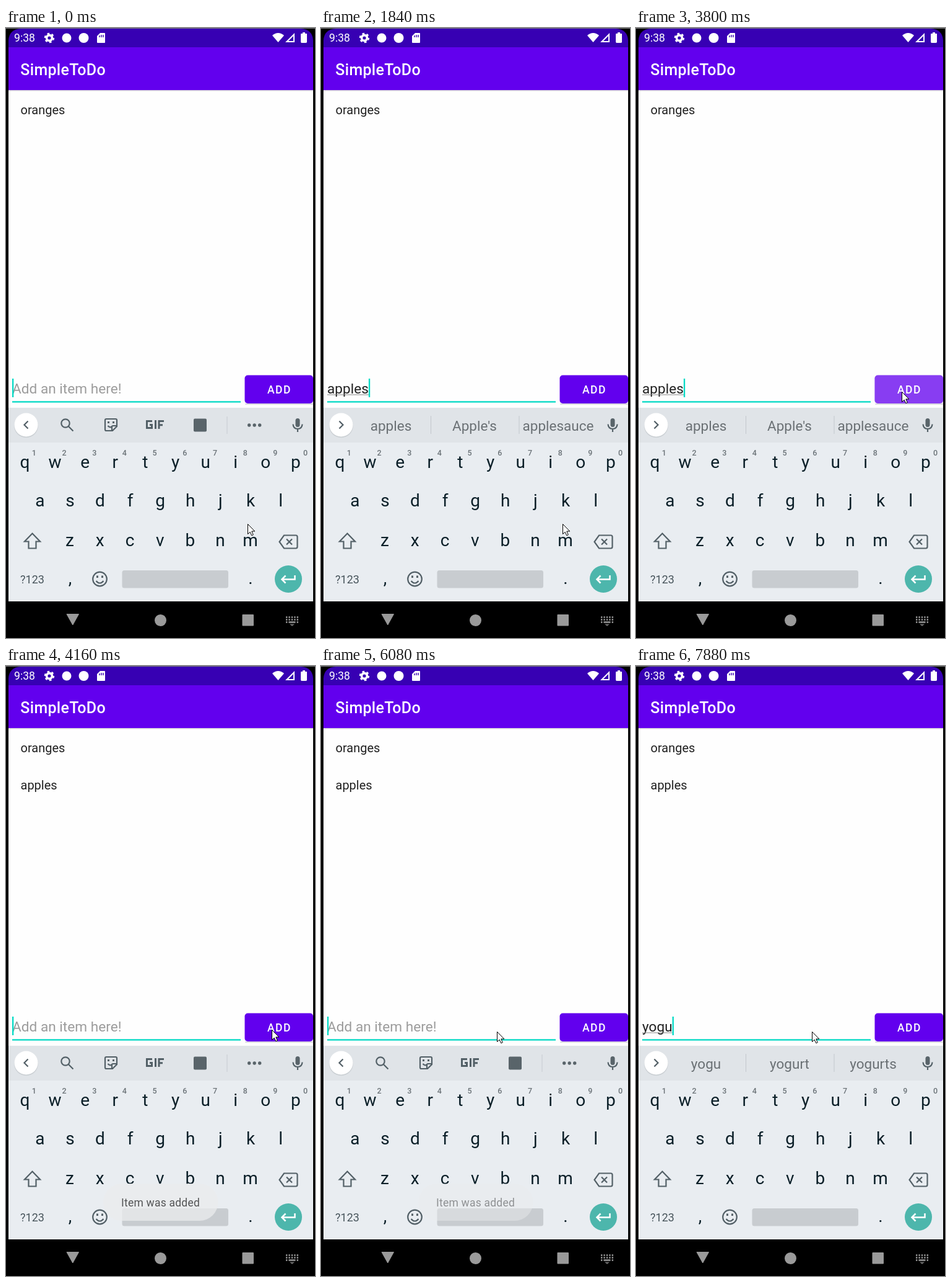
These frames come from a looping animation (499 px wide and 983 px high, 8000 ms). An HTML page:

```html
<!DOCTYPE html>
<html lang="en">
<head>
<meta charset="utf-8">
<title>To-do list</title>
<style>
  html, body { margin: 0; width: 100%; height: 100%; overflow: hidden; background: #000; }
  svg { display: block; width: 499px; height: 983px; }
  text { font-family: Roboto, sans-serif; white-space: pre; }
  .mid { text-anchor: middle; }
  .item { font-size: 20px; fill: #212121; }
  .field { font-size: 22.65px; }
  .key { font-size: 28px; fill: #0b1f28; }
  .num { font-size: 12.5px; font-weight: 500; fill: #6b7378; }
  .sugg { font-size: 22.5px; fill: #6a7074; }
  .strong { font-weight: 700; fill: #0a0a0a; }
  .line { fill: none; stroke: #536067; stroke-width: 2.2; }
  .ink { fill: #59646a; }
</style>
</head>
<body>
<svg viewBox="0 0 499 983">
  <rect width="499" height="983"/>
  <rect width="499" height="1" fill="#77777a"/>

  <!-- status bar -->
  <path d="M4 31V20Q5 2 24 1H476Q495 2 496 20V31Z" fill="#3700b3"/>
  <g fill="#fff">
    <text x="13" y="22" font-size="17.6">9:38</text>
    <circle cx="70" cy="16" r="4.4" fill="none" stroke="#fff" stroke-width="3.6"/>
    <circle cx="70" cy="16" r="7" fill="none" stroke="#fff" stroke-width="2.4" stroke-dasharray="3.66"/>
    <circle cx="98" cy="16" r="7.5"/>
    <circle cx="125.500" cy="16" r="8"/>
    <path d="M152 8H159Q160 8 160 9V23Q160 24 159 24H148Q147 24 147 23V13Z"/>
    <path d="M151 12V15M154 11V15M157 11V15" stroke="#3700b3" stroke-width="1.4"/>
    <path d="M430 12Q439.500 4 449 12L439.500 23Z"/>
    <path d="M466 8V23H451ZM464 13L456 21H464Z" fill-rule="evenodd"/>
    <path d="M477 9H479V7H483V9H485Q486 9 486 10V22Q486 24 484.500 24H477.500Q476 24 476 22V10Q476 9 477 9Z"/>
  </g>

  <!-- app -->
  <rect x="4" y="100" width="492" height="512" fill="#fefefe"/>
  <rect x="4" y="31" width="492" height="69" fill="#6200ee"/>
  <rect x="4" y="100" width="492" height="1.500" fill="#d6d2da"/>
  <text x="23.300" y="75.500" font-size="25" font-weight="500" letter-spacing=".31" fill="#fff">SimpleToDo</text>
  <text class="item" x="23.500" y="139">oranges</text>
  <text class="item" x="23.500" y="199" id="added">apples</text>

  <text class="field" x="10" y="589" fill="#9c9c9c" id="hint">Add an item here!</text>
  <text class="field" x="10" y="589" fill="#212121" id="entry"></text>
  <rect x="10" y="590.500" height="1" fill="#858585" id="compose"/>
  <rect x="10" y="601.300" width="369" height="2.300" fill="#03dac5"/>
  <rect y="565" width="2.300" height="30" fill="#03dac5" id="caret"/>
  <rect x="386" y="605" width="110" height="2" rx="1" fill="#d9d9df"/>
  <rect x="385.500" y="559.500" width="110.500" height="45.500" rx="5" fill="#6200ee"/>
  <rect x="385.500" y="559.500" width="110.500" height="45.500" rx="5" fill="#fff" id="ripple"/>
  <text class="mid" x="441.500" y="589" font-size="17.5" font-weight="500" letter-spacing="1.560" fill="#fff">ADD</text>

  <!-- keyboard -->
  <rect x="4" y="612" width="492" height="312" fill="#e9edf1"/>
  <rect x="4" y="612" width="492" height="56" fill="#e0e4e8"/>
  <circle cx="32.500" cy="641" r="19.300" fill="#cbd0d4"/>
  <circle cx="32.500" cy="639.500" r="19" fill="#fff"/>
  <path class="line" id="chevron"/>

  <g id="tools">
    <circle class="line" cx="96" cy="637" r="6.700"/>
    <path class="line" d="M101 642L108.500 649.500" stroke-width="2.800"/>
    <path class="line" d="M162 630H177Q179 630 179 632V642L172 649H162Q160 649 160 647V632Q160 630 162 630M179 641H173Q171 641 171 643V649M164.500 641Q168 645 171 642"/>
    <path class="ink" d="M164 634H167V637H164ZM172 634H175V637H172Z"/>
    <path class="line" d="M236 633.500H227.500V644.500H235.500V639.500H232M241.500 632V646M247 646V633.500H255M247 639.800H253" style="stroke-width:3"/>
    <rect class="ink" x="303" y="629.500" width="21" height="21" rx="2"/>
    <rect x="356.500" y="626" width="1" height="28" fill="#c5cacf"/>
    <path class="ink" d="M390 640a2.700 2.700 0 1 0 5.400 0a2.700 2.700 0 1 0-5.400 0M398.500 640a2.700 2.700 0 1 0 5.400 0a2.700 2.700 0 1 0-5.400 0M407 640a2.700 2.700 0 1 0 5.400 0a2.700 2.700 0 1 0-5.400 0"/>
  </g>
  <g id="words">
    <path d="M177.500 625V654M320 625V654" stroke="#c2c7cc"/>
    <text class="sugg mid" x="113" y="649"></text>
    <text class="sugg mid" x="248" y="649"></text>
    <text class="sugg mid" x="383" y="649"></text>
  </g>
  <rect class="ink" x="467.500" y="629" width="7" height="14" rx="3.500"/>
  <path class="line" d="M463.500 638.500Q464 646 471 646T478.500 638.500M471 646V651"/>

  <g id="keys"></g>
  <path class="line" d="M42.500 814.500L55 827.500H48.500V838.500H36.500V827.500H30Z"/>
  <path class="line" d="M449 817.500H468Q470.500 817.500 470.500 820V836Q470.500 838.500 468 838.500H449L441.500 828ZM453 823.500L462 832.500M462 823.500L453 832.500"/>
  <text class="mid" x="42.500" y="895" font-size="18" fill="#48555c">?123</text>
  <circle class="line" cx="151.500" cy="888" r="11.300"/>
  <path class="line" d="M145.500 891Q151.500 898 157.500 891"/>
  <path class="ink" d="M146 882.500H149V886H146ZM154 882.500H157V886H154Z"/>
  <rect x="187.500" y="874" width="171.500" height="28.500" rx="3.500" fill="#c8ccd0"/>
  <circle cx="456" cy="888" r="22" fill="#4db6ac"/>
  <path d="M466.500 882V888.500H446M451.500 882.500L445.500 888.500L451.500 894.500" fill="none" stroke="#fff" stroke-width="2.500"/>

  <g id="toast">
    <rect x="157" y="834" width="185.500" height="60" rx="30" fill="#ebecee"/>
    <text class="mid" x="249.500" y="871" font-size="17.500" letter-spacing=".22" fill="#222">Item was added</text>
  </g>

  <!-- navigation bar -->
  <g fill="#9a9a9a">
    <path d="M98 944.500H117.500L107.800 962Z" stroke="#9a9a9a" stroke-linejoin="round"/>
    <circle cx="249.500" cy="954.500" r="9.500"/>
    <rect x="381.500" y="945" width="18.500" height="18.500" rx="1"/>
    <path d="M452 949.500H472M452 953.500H472" stroke="#9a9a9a" stroke-width="2.400" stroke-dasharray="2.400 2"/>
    <path d="M452 957.500H454.400M456.400 957.500H467.500M469.600 957.500H472" stroke="#9a9a9a" stroke-width="2.400"/>
    <path d="M458 960.500H466L462 964Z" opacity=".7"/>
  </g>

  <path id="mouse" d="M.5 .5V16.500L4.200 13.200L6.800 18.800L9.300 17.700L6.800 12H11.800Z" fill="#fff" stroke="#000"/>
</svg>

<script>
const LOOP = 8000;
const $ = id => document.getElementById(id);

function addKey(label, x, y, cls) {
  const el = document.createElementNS("http://www.w3.org/2000/svg", "text");
  el.setAttribute("x", x);
  el.setAttribute("y", y);
  el.setAttribute("class", cls + " mid");
  el.textContent = label;
  $("keys").append(el);
}

[["qwertyuiop", 30.5, 709], ["asdfghjkl", 54.8, 771], ["zxcvbnm", 103, 835]].forEach(([row, x0, y]) =>
  [...row].forEach((c, i) => addKey(c, x0 + i * 48.6, y, "key")));
[..."1234567890"].forEach((c, i) => addKey(c, 45.3 + i * 48.7, 689, "num"));
addKey(",", 103.5, 896, "key");
addKey(".", 395, 896, "key");

// Each step overrides part of the state from its time on.
const steps = [
  [0, { text: "", words: null, bold: false, caret: true, mouse: [390, 799], ripple: 0, added: false, toast: 0 }],
  [120, { caret: false }],
  [490, { text: "a", caret: true }],
  [610, { words: ["a", "and", "at"] }],
  [730, { text: "ap", words: ["ap", "AP", "appreciate"], bold: true }],
  [850, { text: "appl", words: ["appl", "apply", "apple"], bold: false }],
  [1350, { caret: false }],
  [1600, { text: "apple", caret: true }],
  [1720, { words: ["apple", "apples", "Apple"] }],
  [1840, { text: "apples", words: ["apples", "Apple's", "applesauce"] }],
  [2240, { caret: false }],
  [2800, { caret: true }],
  [2940, { mouse: [79, 509] }],
  [3070, { mouse: null }],
  [3220, { mouse: [430, 588] }],
  [3370, { caret: false, mouse: [429, 586] }],
  [3800, { caret: true, ripple: .24 }],
  [3920, { text: "", words: null, added: true }],
  [4040, { ripple: .12, toast: .3 }],
  [4160, { ripple: 0, toast: .75 }],
  [4310, { caret: false, toast: 1 }],
  [4860, { caret: true }],
  [5290, { caret: false }],
  [5420, { mouse: [414, 585] }],
  [5570, { mouse: [381, 585] }],
  [5720, { caret: true, mouse: [300, 588] }],
  [5840, { mouse: [284, 589], toast: .95 }],
  [5960, { toast: .75 }],
  [6080, { toast: .45 }],
  [6200, { toast: .2 }],
  [6350, { caret: false, toast: 0 }],
  [6810, { caret: true }],
  [7060, { text: "y" }],
  [7180, { words: ["y", "you", "your"] }],
  [7300, { text: "yo", words: ["yo", "you", "your"] }],
  [7730, { text: "yog", words: ["yog", "yogurt", "yoga"] }],
  [7880, { text: "yogu", words: ["yogu", "yogurt", "yogurts"] }]
];

const show = (id, on) => { $(id).style.display = on ? "" : "none"; };
const labels = $("words").querySelectorAll("text");

function draw(s) {
  $("entry").textContent = s.text;
  const width = s.text ? $("entry").getComputedTextLength() : 0;
  $("compose").setAttribute("width", width);
  $("caret").setAttribute("x", 10 + width);
  show("caret", s.caret);
  show("hint", !s.text);
  show("added", s.added);
  show("tools", !s.words);
  show("words", s.words);
  labels.forEach((el, i) => { el.textContent = s.words ? s.words[i] : ""; });
  labels[1].classList.toggle("strong", s.bold);
  $("chevron").setAttribute("d", s.words ? "M29.500 633.500L35.500 639.500L29.500 645.500" : "M35.500 633.500L29.500 639.500L35.500 645.500");
  $("ripple").setAttribute("opacity", s.ripple);
  $("toast").setAttribute("opacity", s.toast);
  show("mouse", s.mouse);
  if (s.mouse) $("mouse").setAttribute("transform", `translate(${s.mouse})`);
}

let last = -1;
function tick() {
  const t = performance.now() % LOOP;
  const passed = steps.filter(([at]) => at <= t);
  if (passed.length !== last) {
    last = passed.length;
    draw(Object.assign({}, ...passed.map(([, change]) => change)));
  }
  requestAnimationFrame(tick);
}
tick();
</script>
</body>
</html>
```
